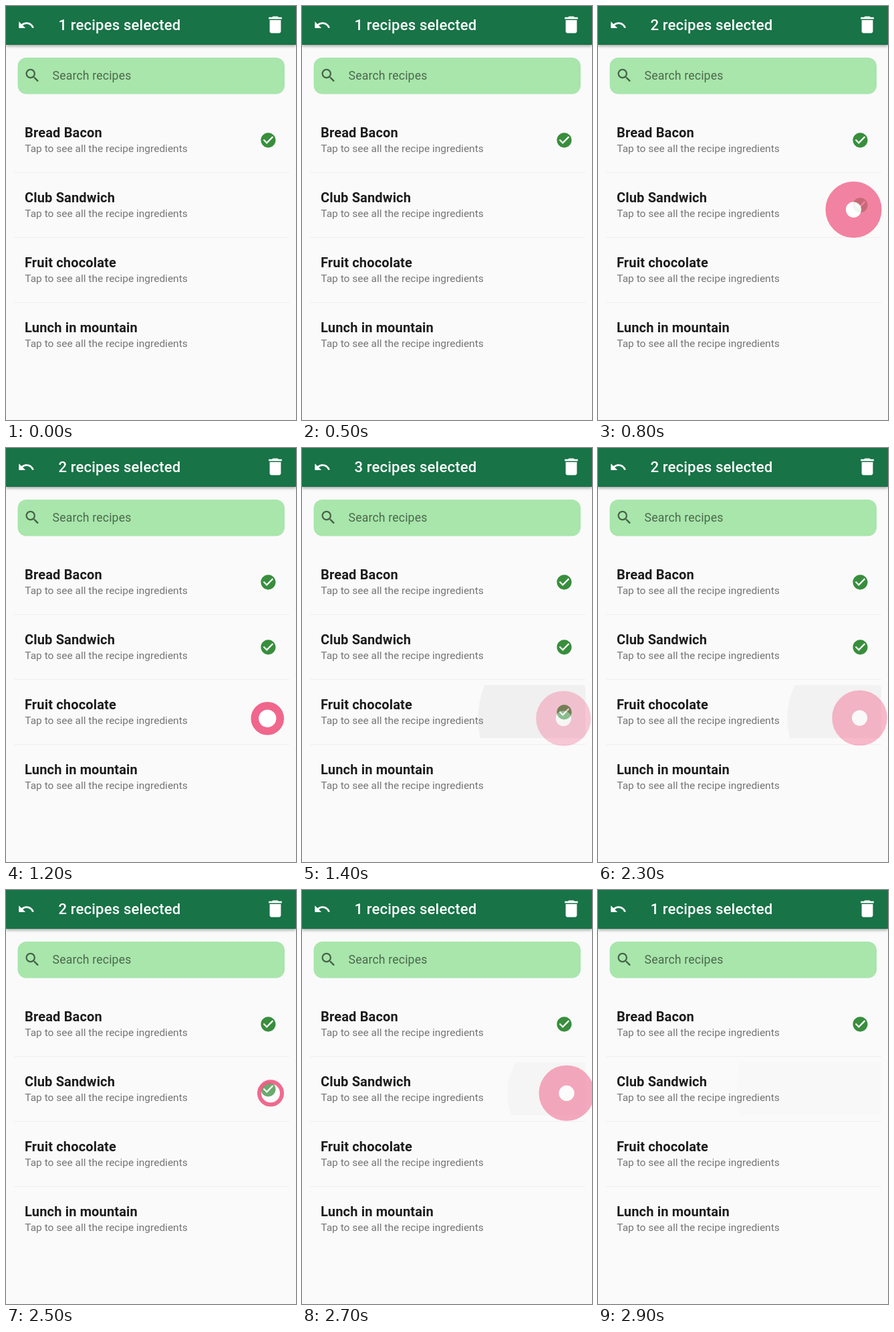
Write an HTML page that moves like this. It is 434 px wide and 618 px high and loops after 3 s.

```html
<!DOCTYPE html>
<html lang="en">
<head>
<meta charset="utf-8">
<title>Recipe selection</title>
<style>
  html, body { margin: 0; width: 100%; height: 100%; overflow: hidden; background: #fafafa; }
  svg { display: block; font-family: Roboto, sans-serif; }
  .bar { fill: #187347; filter: drop-shadow(0 2px 2px rgba(0, 0, 0, .34)); }
  .white { fill: #fff; }
  .head { font-size: 22.1px; font-weight: 500; letter-spacing: .166px; fill: #fff; }
  .hint { font-size: 17.65px; letter-spacing: .166px; fill: rgba(0, 0, 0, .55); }
  .name { font-size: 20px; font-weight: 700; letter-spacing: .16px; fill: #1c1c1c; }
  .note { font-size: 15.5px; fill: #757575; }
</style>
</head>
<body>
<svg width="434" height="618" viewBox="0 0 434 618">
  <clipPath id="tile"><rect id="tileBox" x="12" width="412" height="79" rx="4"/></clipPath>
  <rect width="434" height="618" fill="#fafafa"/>
  <rect class="bar" y="-10" width="434" height="68"/>
  <path class="white" transform="translate(17 15.4) scale(1.105)" d="M12.5 8c-2.65 0-5.05.99-6.9 2.6L2 7v9h9l-3.62-3.62c1.39-1.16 3.16-1.88 5.12-1.88 3.54 0 6.55 2.31 7.6 5.5l2.37-.78C21.08 11.03 17.15 8 12.5 8z"/>
  <text class="head" id="head" x="78.4" y="36"></text>
  <path class="white" transform="translate(386.2 11.2) scale(1.4)" d="M6 19c0 1.1.9 2 2 2h8c1.1 0 2-.9 2-2V7H6v12zM19 4h-3.5l-1-1h-5l-1 1H5v2h14V4z"/>
  <rect x="17.5" y="77" width="399.5" height="54.5" rx="13" fill="#a8e6ab"/>
  <path fill="rgba(0,0,0,.58)" transform="translate(26.2 90.5) scale(1.105)" d="M15.5 14h-.79l-.28-.27C15.41 12.59 16 11.11 16 9.5 16 5.91 13.09 3 9.5 3S3 5.91 3 9.5 5.91 16 9.5 16c1.61 0 3.09-.59 4.23-1.57l.27.28v.79l5 4.99L20.49 19l-4.99-5zm-6 0C7.01 14 5 11.99 5 9.5S7.01 5 9.5 5 14 7.01 14 9.5 11.99 14 9.5 14z"/>
  <text class="hint" x="69.5" y="109.5">Search recipes</text>
  <g clip-path="url(#tile)"><circle id="ink"/></g>
  <g id="rows"></g>
  <circle id="ring" fill="none" stroke="#f06088"/>
  <circle id="dot" fill="#fff"/>
</svg>
<script>
const LOOP = 3000, STEP = 100, PITCH = 97;
const names = ['Bread Bacon', 'Club Sandwich', 'Fruit chocolate', 'Lunch in mountain'];
const taps = [
  { at: 650, row: 1, x: 382.5, y: 304 },
  { at: 1160, row: 2, x: 391.3, y: 403.7 },
  { at: 2080, row: 2, x: 391.5, y: 403 },
  { at: 2500, row: 1, x: 396, y: 303.3 }
];
const TOGGLE = 130;   // ms from touch to selection change

// time, outer radius, dot radius, ring opacity, dot opacity
const touchKeys = [
  [0, 20, 14, .94, .25],
  [40, 24.7, 13, .96, .92],
  [150, 42, 11.5, .78, .92],
  [240, 41, 11.5, .33, .42],
  [310, 40, 11.5, 0, 0]
];
// time, radius, opacity
const inkKeys = [
  [150, 40, 0],
  [240, 128, .038],
  [330, 186, .022],
  [430, 190, 0]
];

const $ = id => document.getElementById(id);
const set = (el, attrs) => { for (const k in attrs) el.setAttribute(k, attrs[k]); };

function sample(keys, t) {
  const i = keys.findIndex(k => k[0] > t);
  if (i < 1) return null;
  const a = keys[i - 1], b = keys[i], u = (t - a[0]) / (b[0] - a[0]);
  return a.slice(1).map((v, j) => v + (b[j + 1] - v) * u);
}

const tick = 'M12 2C6.48 2 2 6.48 2 12s4.48 10 10 10 10-4.48 10-10S17.52 2 12 2zm-2 15l-5-5 1.41-1.41L10 14.17l7.59-7.59L19 8l-9 9z';
$('rows').innerHTML = names.map((name, i) => `
  <g transform="translate(0 ${i * PITCH})">
    <text class="name" x="28" y="196">${name}</text>
    <text class="note" x="28.3" y="218">Tap to see all the recipe ingredients</text>
    <path class="tick" fill="#388e3c" transform="translate(379.2 187.1) scale(1.105)" d="${tick}"/>
    ${i < 3 ? '<rect x="12" y="248" width="412" height="1" fill="#eeeeef"/>' : ''}
  </g>`).join('');
const ticks = document.querySelectorAll('.tick');

function draw(t) {
  const on = [true, false, false, false];
  let touch = null, ink = null, hit = taps[0];
  for (const tap of taps) {
    const age = t - tap.at;
    if (age < 0) break;
    if (age >= TOGGLE) on[tap.row] = !on[tap.row];
    hit = tap;
    touch = sample(touchKeys, age);
    ink = sample(inkKeys, age);
  }
  ticks.forEach((el, i) => { el.style.display = on[i] ? '' : 'none'; });
  $('head').textContent = `${on.filter(Boolean).length} recipes selected`;

  const [outer, inner, ringAlpha, dotAlpha] = touch || [1, 0, 0, 0];
  const at = { cx: hit.x, cy: hit.y };
  set($('ring'), { ...at, r: (outer + inner) / 2, 'stroke-width': outer - inner, opacity: ringAlpha });
  set($('dot'), { ...at, r: inner, opacity: dotAlpha });

  const [radius, alpha] = ink || [0, 0];
  set($('ink'), { ...at, r: radius, opacity: alpha });
  set($('tileBox'), { y: 160 + hit.row * PITCH });
}

const start = performance.now();
function frame(now) {
  const t = Math.max(0, now - start) % LOOP;
  draw(Math.floor(t / STEP) * STEP);
  requestAnimationFrame(frame);
}
draw(0);
requestAnimationFrame(frame);
</script>
</body>
</html>
```
